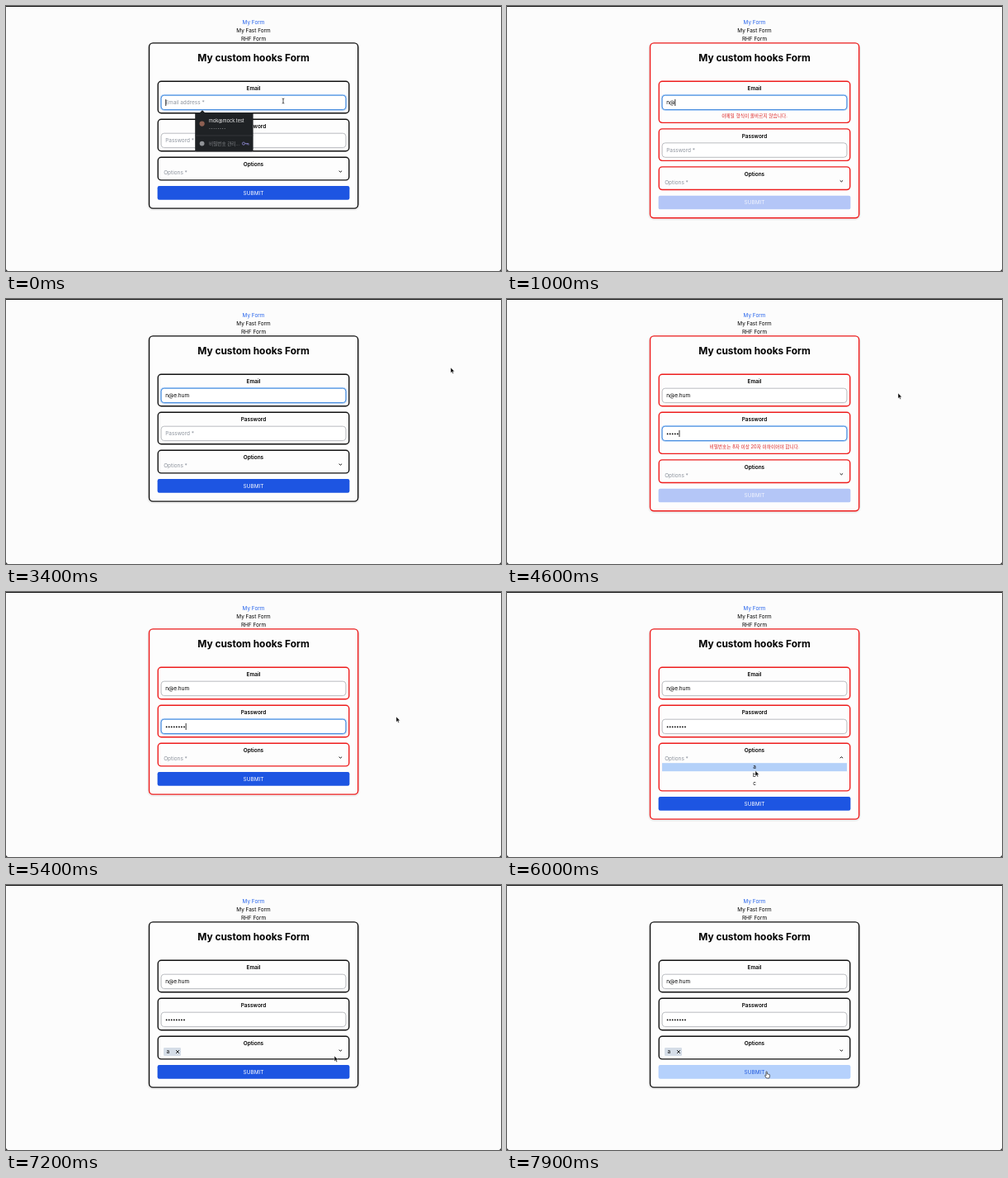
An HTML page for the animation above (8 s loop, 600 by 321 pixels).

```html
<!DOCTYPE html>
<html lang="en">
<head>
<meta charset="utf-8">
<title>Form</title>
<style>
html, body { margin: 0; width: 100%; height: 100%; overflow: hidden; background: #fcfcfc; }
svg { display: block; width: 600px; height: 321px; }
text { font: 400 6.45px Inter, "Noto Sans CJK KR", "Noto Sans CJK", sans-serif; white-space: pre; }
.mid { text-anchor: middle; }
.label { font-weight: 600; }
.hint { fill: #8d939d; }
.error { font-size: 5.7px; fill: #dc2626; }
.frame { fill: none; stroke-width: 1.4; }
.field { fill: #fff; }
</style>
</head>
<body>
<svg id="stage" viewBox="0 0 600 321">
  <rect width="600" height="321" fill="#fcfcfc"/>
  <rect width="600" height="1" fill="#151515"/>
  <path d="M0 318.5V321H2.5Q.4 320.6 0 318.5ZM600 318.5V321H597.5Q599.6 320.6 600 318.5Z" fill="#222"/>
  <g class="mid">
    <text x="300" y="21.8" fill="#2563eb">My Form</text>
    <text x="300" y="31.8">My Fast Form</text>
    <text x="300" y="41.8">RHF Form</text>
  </g>
  <rect id="shade" x="173" y="46" width="254" rx="5" fill="none" stroke="#000" stroke-opacity=".05" stroke-width="4"/>
  <rect id="card" class="frame" x="173.5" y="44.9" width="253.2" rx="4.6" style="fill:#fdfdfd"/>
  <text class="mid" x="300" y="67.4" style="font-size:11.9px;font-weight:700">My custom hooks Form</text>

  <g id="email">
    <rect class="frame" x="184.2" y="91.2" width="231.6" rx="4"/>
    <text class="mid label" x="300" y="102.3">Email</text>
    <rect class="halo" x="187.6" y="107.8" width="224.8" height="18.2" rx="4" fill="none" stroke="#c3dcfa" stroke-width="2"/>
    <rect class="field" x="188.1" y="108.2" width="223.8" height="17.4" rx="3.6"/>
    <text class="hint" x="193.2" y="119.3">Email address *</text>
    <text class="value" x="193.2" y="119.3"></text>
    <rect class="caret" y="113" width=".8" height="8"/>
    <text class="mid error" x="300" y="135.4">이메일 형식이 올바르지 않습니다.</text>
  </g>

  <g id="pass">
    <rect class="frame" x="184.2" y="137.2" width="231.6" rx="4"/>
    <text class="mid label" x="300" y="148.3">Password</text>
    <rect class="halo" x="187.6" y="153.8" width="224.8" height="18.2" rx="4" fill="none" stroke="#c3dcfa" stroke-width="2"/>
    <rect class="field" x="188.1" y="154.2" width="223.8" height="17.4" rx="3.6"/>
    <text class="hint" x="193.2" y="165.3">Password *</text>
    <g class="value"></g>
    <rect class="caret" y="159" width=".8" height="8"/>
    <text class="mid error" x="300" y="181.4">비밀번호는 8자 이상 20자 이하이어야 합니다.</text>
  </g>

  <g id="options">
    <rect class="frame" x="184.2" y="183.2" width="231.6" rx="4"/>
    <text class="mid label" x="300" y="194.3">Options</text>
    <text id="pick" class="hint" x="191.2" y="204.3">Options *</text>
    <g id="chip">
      <rect x="191" y="197" width="21" height="10" rx="1.2" fill="#d5dde7"/>
      <text x="194.4" y="204.2">a</text>
      <path d="M206.1 200.1l3.8 3.8m0-3.8l-3.8 3.8" stroke="#111" stroke-width=".9"/>
    </g>
    <path id="chevron" fill="none" stroke="#111" stroke-width="1"/>
    <g id="list"></g>
  </g>

  <g id="submit">
    <rect x="183.6" y="218" width="232.8" height="16.7" rx="2.2"/>
    <text class="mid" x="300" y="228.7">SUBMIT</text>
  </g>

  <g id="popup">
    <path d="M230.5 129H235L238 126.3L241 129H298Q299.6 129 299.6 130.6V174.6Q299.6 176.2 298 176.2H230.8Q229.2 176.2 229.2 174.6V130.6Q229.2 129 230.5 129Z" fill="#1f2225"/>
    <rect x="229.2" y="156.6" width="70.4" height=".7" fill="#3b3e42"/>
    <circle cx="237.6" cy="142.6" r="3.1" fill="#8d5f52"/>
    <text x="246" y="141" fill="#f2f2f2" style="font-size:5.6px">mok@mock.test</text>
    <g id="stars" fill="#9b9da0"></g>
    <circle cx="237.6" cy="166.6" r="2.9" fill="#909397"/>
    <text x="246" y="169" fill="#85888c" style="font-size:5.6px">비밀번호 관리...</text>
    <g fill="none" stroke="#8581c4" stroke-width=".9">
      <circle cx="288" cy="166.6" r="1.6"/>
      <path d="M289.6 166.6H294V168.6M292.2 166.6V168.2"/>
    </g>
  </g>

  <g id="mouse">
    <path id="beam" d="M-1.3 -3Q0 -3 0 -2Q0 -3 1.3 -3M0 -2V2M-1.3 3Q0 3 0 2Q0 3 1.3 3" fill="none" stroke="#222" stroke-width=".8"/>
    <path id="arrow" d="M0 0V6.5L1.5 5.2L2.5 7.5L3.6 7L2.6 4.8H4.6Z" fill="#000" stroke="#fff" stroke-width=".5"/>
    <path id="hand" d="M-.6 .4Q0 -.5 .6 .4V3Q1.2 2.5 1.7 3.1Q2.4 2.7 2.8 3.4Q3.7 3.1 3.8 4.2V5.8L3.1 8H-.1L-2 5.3Q-2.1 4.3 -1.2 4.6L-.6 5.1Z" fill="#fff" stroke="#222" stroke-width=".7"/>
  </g>
</svg>
<script>
const LOOP = 8000, ERROR_H = 11.67, ROW = 10;
const $ = s => document.querySelector(s);
const set = (el, attrs) => { for (const k in attrs) el.setAttribute(k, attrs[k]); };
const show = (el, on) => set(el, { visibility: on ? 'visible' : 'hidden' });
const move = (el, x, y) => set(el, { transform: `translate(${x} ${y})` });
const add = (parent, tag, attrs, text = '') => {
  const el = document.createElementNS('http://www.w3.org/2000/svg', tag);
  set(el, attrs);
  el.textContent = text;
  return parent.appendChild(el);
};
const within = (t, a, b) => t >= a && t < b;

// [time, email text]
const typing = [[0, ''], [600, 'n'], [1000, 'n@'], [1300, 'n@e'], [1500, 'n@e.'], [1700, 'n@e.h'],
  [1800, 'n@e.hu'], [1900, 'n@e.hui'], [2000, 'n@e.huim'], [2400, 'n@e.hui'], [2500, 'n@e.hu'], [2700, 'n@e.hum']];
// [time, x, y] for each stretch where the pointer is visible
const trips = [
  [[0, 336, 115], [100, 408, 105], [200, 506, 89], [300, 552, 81], [600, 552, 81]],
  [[3300, 537, 85], [3400, 539, 83], [3800, 539, 83]],
  [[4600, 474, 114], [4800, 489, 121], [5200, 482, 135], [5400, 473, 151], [5500, 460, 170],
   [5700, 404, 200], [6000, 301, 216.5], [6300, 300, 213], [6400, 335, 206], [6600, 456, 186],
   [6800, 484, 187], [7000, 456, 194], [7200, 398, 207], [7500, 336, 223], [7700, 316, 226], [8000, 314, 226]]
];
const OPEN = 5700, CHOSEN = 6400;

const parts = id => {
  const box = $(id), q = s => box.querySelector(s);
  return { box, frame: q('.frame'), halo: q('.halo'), field: q('.field'), hint: q('.hint'),
    value: q('.value'), caret: q('.caret'), error: q('.error') };
};
const email = parts('#email'), pass = parts('#pass'), options = parts('#options');
const dots = [], rows = [];
for (let i = 0; i < 8; i++) {
  dots.push(add(pass.value, 'circle', { cx: 194.6 + 3.05 * i, cy: 163.4, r: .9 }));
  add($('#stars'), 'circle', { cx: 247 + 2.6 * i, cy: 148.6, r: .5 });
}
['a', 'b', 'c'].forEach((name, i) => {
  const y = 207.2 + ROW * i;
  rows.push(add($('#list'), 'rect', { x: 188, y, width: 224, height: ROW }));
  add($('#list'), 'text', { x: 300, y: y + 7.2, class: 'mid' }, name);
});

function pointer(t) {
  const trip = trips.find(p => within(t, p[0][0], p[p.length - 1][0]));
  if (!trip) return null;
  const i = trip.findIndex(p => p[0] > t);
  const [t0, x0, y0] = trip[i - 1], [t1, x1, y1] = trip[i];
  const k = (t - t0) / (t1 - t0);
  return [x0 + (x1 - x0) * k, y0 + (y1 - y0) * k];
}

function drawField(f, focus, filled, caretX, blink, bad) {
  show(f.halo, focus);
  set(f.field, { stroke: focus ? '#3b86dc' : '#b4b6ba', 'stroke-width': focus ? 1 : .9 });
  show(f.hint, !filled);
  show(f.caret, focus && blink);
  set(f.caret, { x: caretX });
  show(f.error, bad);
}

function draw(now) {
  const t = Math.floor(now % LOOP / 100) * 100;
  const last = typing.filter(k => k[0] <= t).pop();
  const count = Math.max(0, Math.min(8, Math.floor((t - 3800) / 200) + 1));
  const badMail = within(t, 600, 1800), badPass = count > 0 && count < 8;
  const bad = badMail || badPass;
  const open = within(t, OPEN, CHOSEN), chosen = t >= CHOSEN;
  const ink = within(t, 600, 3200) || within(t, 3800, 6900) ? '#ee1c1c' : '#111';

  // text fields
  email.value.textContent = last[1];
  const keyTime = t < 600 ? -300 : last[0];
  const mailEnd = 193.4 + (last[1] ? email.value.getComputedTextLength() : 0);
  drawField(email, t < 3600, last[1] !== '', mailEnd, (t - keyTime) % 1000 < 500, badMail);
  const passKey = count ? 3600 + 200 * count : 3600;
  dots.forEach((d, i) => show(d, i < count));
  drawField(pass, within(t, 3600, OPEN), count > 0, 193.3 + 3.05 * count, (t - passKey) % 1000 < 500, badPass);

  // layout
  const dyPass = badMail ? ERROR_H : 0, dyOpt = bad ? ERROR_H : 0;
  const grow = open ? 3 * ROW : 0, dy = dyOpt + grow;
  move(pass.box, 0, dyPass);
  move(options.box, 0, dyOpt);
  move($('#submit'), 0, dy);
  set(email.frame, { height: 38.5 + (badMail ? ERROR_H : 0), stroke: ink });
  set(pass.frame, { height: 38.5 + (badPass ? ERROR_H : 0), stroke: ink });
  set(options.frame, { height: 27.7 + grow, stroke: ink });
  set($('#card'), { height: 200.2 + dy, stroke: ink });
  set($('#shade'), { height: 200 + dy });

  // select box
  const p = pointer(t);
  show($('#pick'), !chosen);
  show($('#chip'), chosen);
  set($('#chevron'), { d: open ? 'M403.7 201.2L405.4 199.7L407.1 201.2' : 'M403.7 199.7L405.4 201.2L407.1 199.7' });
  set($('#list'), { display: open ? 'inline' : 'none' });
  const hot = p ? Math.floor((p[1] - 207.2) / ROW) : -1;
  rows.forEach((r, i) => set(r, { fill: i === hot ? '#b4d1f9' : 'none' }));

  // button
  const hover = t > 7000 && p && p[1] >= 218;
  const [face, label] = bad ? ['#b4c6f7', '#f1f4fd'] : hover ? ['#b5d1fc', '#2059dc'] : ['#1d55e2', '#fff'];
  set($('#submit rect'), { fill: face });
  set($('#submit text'), { fill: label });

  show($('#popup'), t < 600);
  set($('#mouse'), { display: p ? 'inline' : 'none' });
  if (p) move($('#mouse'), ...p);
  const shape = t < 100 ? 'beam' : hover ? 'hand' : 'arrow';
  for (const id of ['beam', 'arrow', 'hand']) show($('#' + id), id === shape);
}

const start = performance.now();
function tick() {
  draw(performance.now() - start);
  requestAnimationFrame(tick);
}
tick();
</script>
</body>
</html>
```
